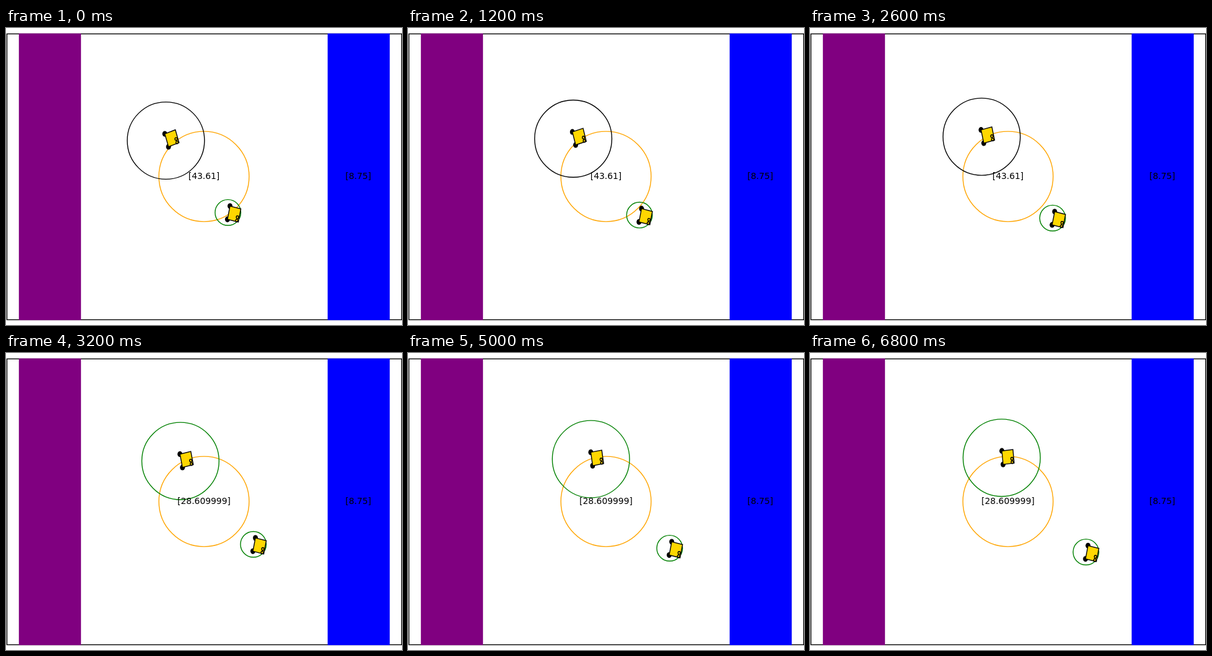
These frames come from a looping animation (640x480 px, 6.9 s). An HTML page with a canvas:

```html
<!DOCTYPE html>
<html lang="en">
<head>
<meta charset="utf-8">
<title>Two robots in an arena</title>
<style>
  html, body { margin: 0; width: 100%; height: 100%; overflow: hidden; background: #fff; }
  canvas { display: block; width: 640px; height: 480px; }
</style>
</head>
<body>
<canvas id="stage" width="640" height="480"></canvas>
<script>
const ctx = document.getElementById('stage').getContext('2d');

const STEP = 100, STEPS = 69, DROP_STEP = 29;
const LINE = 100 / 72;            // one point at 100 dpi
const SX = 199.53, SY = 231.27;   // pixels per metre on each axis

function ring(x, y, r, color) {
  ctx.beginPath();
  ctx.arc(x, y, r, 0, 2 * Math.PI);
  ctx.strokeStyle = color;
  ctx.stroke();
}

function band(x, color) {
  ctx.fillStyle = ctx.strokeStyle = color;
  ctx.fillRect(x, 9.5, 99, 462);
  ctx.strokeRect(x, 9.5, 99, 462);
}

function label(text, x) {
  ctx.fillStyle = '#000';
  ctx.fillText(text, x, 244);
}

// Heading is in metres space, positive downwards; (x, y) is the marker centre.
function robot(x, y, heading) {
  const c = Math.cos(heading), s = Math.sin(heading);
  const at = (fwd, right) => [
    x + SX * (fwd * c - right * s),
    y + SY * (fwd * s + right * c)
  ];
  const dot = (fwd, right, r) => {
    const [px, py] = at(fwd, right);
    ctx.beginPath();
    ctx.ellipse(px, py, r * SX, r * SY, 0, 0, 2 * Math.PI);
  };
  const axle = 0.0065, half = 0.0475, nose = axle + 0.09;

  ctx.fillStyle = ctx.strokeStyle = '#000';
  for (const side of [-half, half]) {
    dot(axle, side, 0.02);
    ctx.fill();
  }

  ctx.beginPath();
  ctx.moveTo(...at(axle, -half));
  ctx.lineTo(...at(nose, -half));
  ctx.lineTo(...at(nose, half));
  ctx.lineTo(...at(axle, half));
  ctx.closePath();
  ctx.fillStyle = '#ffd700';
  ctx.fill();
  ctx.stroke();

  for (const side of [0.015, 0.04]) {
    dot(axle + 0.0756, side, 0.0095);
    ctx.stroke();
  }
}

function draw(i) {
  const dropped = i >= DROP_STEP;
  const ax = 258.4 + 0.715 * i + 0.0006 * i * i;
  const ay = 182 - 0.275 * i + 0.0013 * i * i;
  const turn = Math.atan2((-0.275 + 0.0026 * i) / SY, (0.715 + 0.0012 * i) / SX);
  const bx = 358.7 + 1.284 * i;
  const by = 298.2 + 0.3456 * i;

  ctx.fillStyle = '#fff';
  ctx.fillRect(0, 0, 640, 480);
  ctx.lineWidth = LINE;
  ctx.strokeStyle = '#000';
  ctx.strokeRect(1.5, 9.5, 638, 462);
  band(21.5, '#800080');
  band(520.5, '#0000ff');

  ring(320, 240, 72.9, '#ffa500');
  ring(ax, ay, 62.4, dropped ? '#008000' : '#000');
  ring(bx, by, 20.8, '#008000');
  robot(ax, ay, turn);
  robot(bx, by, 12.5 * Math.PI / 180);

  ctx.font = '13.89px "DejaVu Sans", sans-serif';
  ctx.textAlign = 'center';
  ctx.textBaseline = 'alphabetic';
  label(dropped ? '[28.609999]' : '[43.61]', 320);
  label('[8.75]', 569.4);
}

const start = performance.now();
function tick() {
  const t = Math.max(0, performance.now() - start);
  draw(Math.floor(t / STEP) % STEPS);
  requestAnimationFrame(tick);
}
tick();
</script>
</body>
</html>
```
